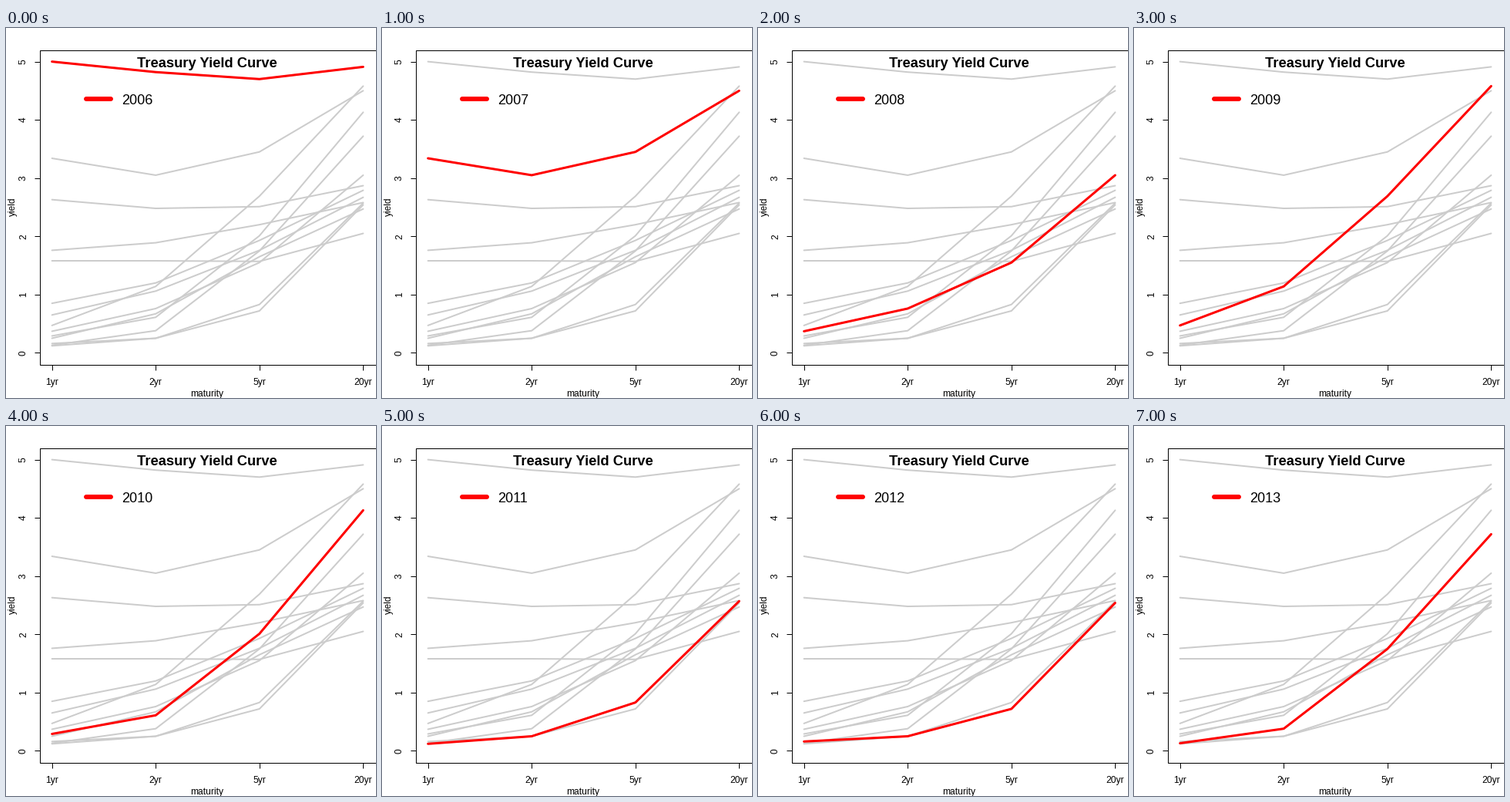
Write a matplotlib script that moves like this. It is 480 px wide and 480 px high and loops after 8 s.

```python
import matplotlib.pyplot as plt
from matplotlib.animation import FuncAnimation
from matplotlib.patches import Rectangle

SIZE = 480
FIRST_YEAR = 2006
SHOWN = 8
GRAY, RED = "#cccccc", "#ff0000"
LEFT, RIGHT, TOP, BOTTOM = 43.5, 479.5, 28.5, 436.5
MATURITIES = ["1yr", "2yr", "5yr", "20yr"]

# One row per year, from FIRST_YEAR on
YIELDS = [
    (5.00, 4.82, 4.70, 4.91),
    (3.34, 3.05, 3.45, 4.50),
    (0.37, 0.76, 1.55, 3.05),
    (0.47, 1.14, 2.69, 4.58),
    (0.29, 0.61, 2.01, 4.13),
    (0.12, 0.25, 0.83, 2.57),
    (0.16, 0.25, 0.72, 2.54),
    (0.13, 0.38, 1.75, 3.72),
    (0.25, 0.67, 1.65, 2.47),
    (0.65, 1.06, 1.76, 2.67),
    (0.85, 1.20, 1.93, 2.79),
    (1.76, 1.89, 2.20, 2.58),
    (2.63, 2.48, 2.51, 2.87),
    (1.58, 1.58, 1.57, 2.05),
]

plt.rcParams["font.family"] = "Liberation Sans"
plt.rcParams["toolbar"] = "None"


def px(i):
    """Stage x of a maturity index, with a 4% margin inside the box."""
    return LEFT + (RIGHT - LEFT) * (0.04 + i / 3) / 1.08


def py(v):
    """Stage y of a yield, with a 4% margin inside the box."""
    return BOTTOM - (BOTTOM - TOP) * (0.04 + v / 5) / 1.08


fig = plt.figure(figsize=(SIZE / 72, SIZE / 72), dpi=72, facecolor="white")
ax = fig.add_axes([0, 0, 1, 1])
ax.set_xlim(0, SIZE)
ax.set_ylim(SIZE, 0)
ax.axis("off")


def stroke(xs, ys, color, width, z):
    return ax.plot(xs, ys, color=color, lw=width, zorder=z,
                   solid_capstyle="round", solid_joinstyle="round")[0]


def tick(xs, ys):
    ax.plot(xs, ys, color="black", lw=1, solid_capstyle="butt", snap=True)


def label(x, y, text, size=12, **kw):
    kw = {"ha": "center", "va": "baseline", "zorder": 6, **kw}
    return ax.text(x, y, text, fontsize=size, color="black", **kw)


def side_label(x, y, text):
    label(x, y, text, rotation=90, rotation_mode="anchor")


ax.add_patch(Rectangle((LEFT, TOP), RIGHT - LEFT, BOTTOM - TOP, fill=False,
                       ec="black", lw=1, snap=True, zorder=1))
for i, name in enumerate(MATURITIES):
    tick([px(i)] * 2, [BOTTOM, BOTTOM + 7])
    label(px(i), 463, name)
for v in range(6):
    tick([LEFT - 7, LEFT], [py(v)] * 2)
    side_label(26, py(v), str(v))
label(261, 478, "maturity")
side_label(12, 232, "yield")
label(261.3, 51, "Treasury Yield Curve", 18.4, weight="bold")

xs = [px(i) for i in range(4)]
for row in YIELDS:
    stroke(xs, [py(v) for v in row], GRAY, 2, 3)
curve = stroke(xs, xs, RED, 3, 4)
stroke([104, 135.5], [91.5, 91.5], RED, 6, 5)
year = label(150.5, 99, "", 18, ha="left")


def update(n):
    curve.set_ydata([py(v) for v in YIELDS[n]])
    year.set_text(str(FIRST_YEAR + n))
    return curve, year


anim = FuncAnimation(fig, update, frames=SHOWN, interval=1000,
                     repeat=True, repeat_delay=0, blit=False)
plt.show()
```
